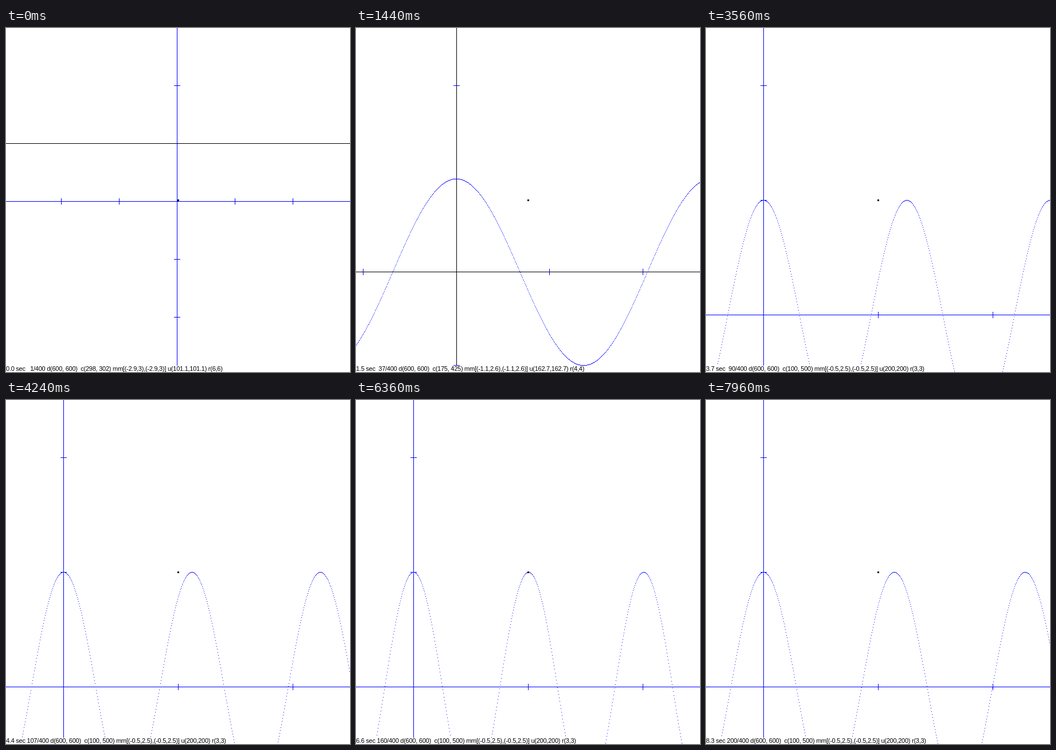
Write an HTML page with a canvas that moves like this. It is 600x600 px and loops after 8000 ms.

```html
<!DOCTYPE html>
<html lang="en">
<head>
<meta charset="utf-8">
<title>Cosine with changing frequency</title>
<style>
  html, body { margin: 0; width: 100%; height: 100%; overflow: hidden; background: #fff; }
  canvas { display: block; }
</style>
</head>
<body>
<canvas id="stage" width="600" height="600"></canvas>
<script>
const SIZE = 600, STEP = 40, STEPS = 200, TOTAL = 400, ZOOM_STEPS = 48;
const BLUE = '#0000ff', BLACK = '#000';
const ctx = document.getElementById('stage').getContext('2d');

const rect = (color, x, y, w, h) => {
  ctx.fillStyle = color;
  ctx.fillRect(x, y, w, h);
};
const short = v => String(+v.toFixed(1));
const pair = (a, b = a) => `(${a},${b})`;
// Full-length axes turn dark on odd pixel positions.
const axisColor = pos => pos % 2 ? BLACK : BLUE;

function drawAxes(view) {
  const { cx, cy, toX, toY } = view;
  rect(axisColor(cy), 0, cy, SIZE, 1);
  rect(axisColor(cx), cx, 0, 1, SIZE);
  for (let v = -3; v <= 3; v++) {
    if (!v) continue;
    rect(BLUE, Math.round(toX(v)), cy - 5, 1, 11);
    rect(BLUE, cx - 5, Math.round(toY(v)), 11, 1);
  }
}

function drawCurve(view, seconds) {
  const omega = 2 * Math.PI * Math.sin(seconds / 4);
  const color = seconds ? BLUE : BLACK;
  for (let px = 0; px < SIZE; px++) {
    const x = view.min + px / view.unit;
    rect(color, px, Math.round(view.toY(Math.cos(omega * x))), 1, 1);
  }
}

function drawStatus(view, count, seconds) {
  const { cx, cy, min, max, unit, range } = view;
  const span = pair(short(min), short(max));
  const text = `${seconds.toFixed(1)} sec ${String(count).padStart(3)}/${TOTAL}` +
    ` d(${SIZE}, ${SIZE})  c(${cx}, ${cy}) mm[${span},${span}]` +
    ` u${pair(short(unit))} r${pair(Math.round(range))}`;
  ctx.font = '11px "Liberation Sans", Arial, sans-serif';
  ctx.letterSpacing = '-0.25px';
  ctx.fontKerning = 'none';
  rect('#fff', 0, 589, Math.ceil(ctx.measureText(text).width), 11);
  ctx.fillStyle = BLACK;
  ctx.fillText(text, 0, 598);
}

function draw(step) {
  const count = step + 1, seconds = step / 24;
  const zoom = Math.min(count / ZOOM_STEPS, 1);
  const min = -3 + 2.5 * zoom, max = 3 - 0.5 * zoom;
  const range = max - min, unit = SIZE / range;
  const toX = x => (x - min) * unit, toY = y => (max - y) * unit;
  const view = { min, max, range, unit, toX, toY,
    cx: Math.round(toX(0)), cy: Math.round(toY(0)) };

  rect('#fff', 0, 0, SIZE, SIZE);
  drawAxes(view);
  drawCurve(view, seconds);
  rect(BLACK, 299, 299, 3, 3);
  drawStatus(view, count, seconds);
}

const start = performance.now();
let shown = -1;
function tick() {
  const step = Math.floor((performance.now() - start) / STEP) % STEPS;
  if (step !== shown) draw(shown = step);
  requestAnimationFrame(tick);
}
tick();
</script>
</body>
</html>
```
